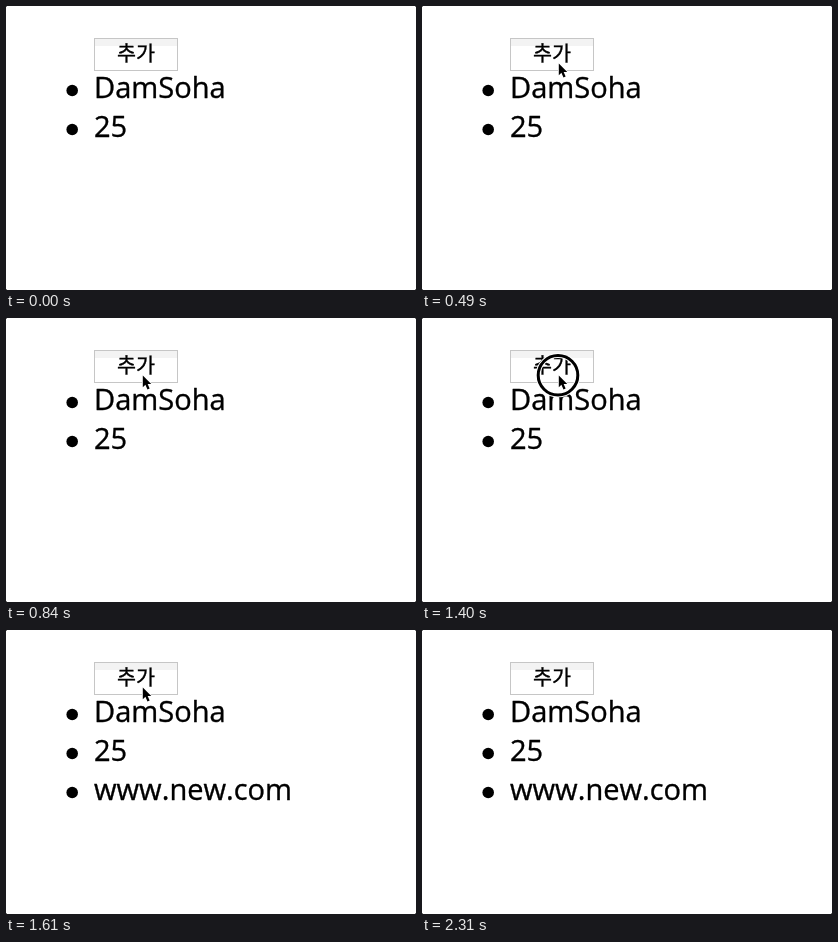
Write an HTML page with a canvas that moves like this. It is 410x284 px and loops after 2590 ms.

```html
<!DOCTYPE html>
<html lang="ko">
<head>
<meta charset="utf-8">
<style>
html, body { margin: 0; width: 100%; height: 100%; overflow: hidden; background: #fff; }
canvas { display: block; }
</style>
</head>
<body>
<canvas id="stage" width="410" height="284"></canvas>
<script>
const ctx = document.getElementById('stage').getContext('2d');
const LOOP = 2590, STEP = 70;
const REST = { x: 136, y: 57 };
const within = (t, from, to) => t >= from && t < to;
const mix = (a, b, k) => a + (b - a) * k;

function rect(x, y, w, h, fill) {
  ctx.fillStyle = fill;
  ctx.fillRect(x, y, w, h);
}

// Text with a hairline outline for a slightly heavier weight.
function label(text, x, y, font, align) {
  ctx.font = font;
  ctx.textAlign = align;
  ctx.fontKerning = 'none';
  ctx.fillStyle = ctx.strokeStyle = '#000';
  ctx.lineWidth = 0.35;
  ctx.lineJoin = 'round';
  ctx.fillText(text, x, y);
  ctx.strokeText(text, x, y);
}

function button(pressed) {
  rect(88, 32, 84, 33, pressed ? '#c3c3c3' : '#c6c6c6');
  if (pressed) {
    rect(88, 32, 84, 32, '#c9c9c9');
    rect(92, 41, 79, 23, '#d0d0d0');
  } else {
    rect(89, 33, 82, 31, '#fff');
    rect(89, 33, 82, 7, '#f3f3f3');
  }
  label('추가', 130, 55, '20.7px "Noto Sans CJK KR", "Noto Sans CJK", sans-serif', 'center');
}

function item(text, row) {
  const y = row * 39;
  ctx.fillStyle = '#000';
  ctx.beginPath();
  ctx.arc(66.2, 84.5 + y, 5.8, 0, Math.PI * 2);
  ctx.fill();
  label(text, 88, 92.3 + y, '29px "Open Sans", "Noto Sans", sans-serif', 'left');
}

function ring() {
  for (const [color, width] of [['#fff', 5], ['#000', 3]]) {
    ctx.strokeStyle = color;
    ctx.lineWidth = width;
    ctx.beginPath();
    ctx.arc(REST.x, REST.y + 0.3, 19.8, 0, Math.PI * 2);
    ctx.stroke();
  }
}

function pointer({ x, y }) {
  ctx.save();
  ctx.translate(x + 0.8, y + 0.6);
  ctx.scale(0.9, 0.93);
  ctx.beginPath();
  [[0, 0], [0, 12.6], [2.9, 9.9], [5.2, 15], [7.6, 14], [5.4, 9.1], [9.4, 9.1]]
    .forEach(([px, py]) => ctx.lineTo(px, py));
  ctx.closePath();
  ctx.lineJoin = 'round';
  ctx.strokeStyle = '#fff';
  ctx.lineWidth = 1.8;
  ctx.stroke();
  ctx.fillStyle = '#000';
  ctx.fill();
  ctx.restore();
}

// The pointer moves in sampled steps, decelerating in and accelerating out.
function pointerAt(t) {
  if (t < 70 || t >= 2310) return null;
  if (t < 490) {
    const k = 1 - (1 - Math.floor((t - 70) / STEP) / 6) ** 2;
    return { x: mix(195, REST.x, k), y: mix(251, REST.y, k) };
  }
  if (t < 2170) return REST;
  const k = t < 2240 ? 0.3 : 1;
  return { x: mix(REST.x, 181, k), y: mix(REST.y, 213, k) };
}

function draw(t) {
  rect(0, 0, 410, 284, '#fff');
  for (const x of [0, 409]) for (const y of [0, 283]) rect(x, y, 1, 1, '#777');
  button(within(t, 1470, 1610));
  item('DamSoha', 0);
  item('25', 1);
  if (t >= 1610) item('www.new.com', 2);
  if (within(t, 770, 840) || within(t, 1400, 1470)) ring();
  const at = pointerAt(t);
  if (at) pointer(at);
}

const start = performance.now();
function tick() {
  draw((performance.now() - start) % LOOP);
  requestAnimationFrame(tick);
}
tick();
</script>
</body>
</html>
```
